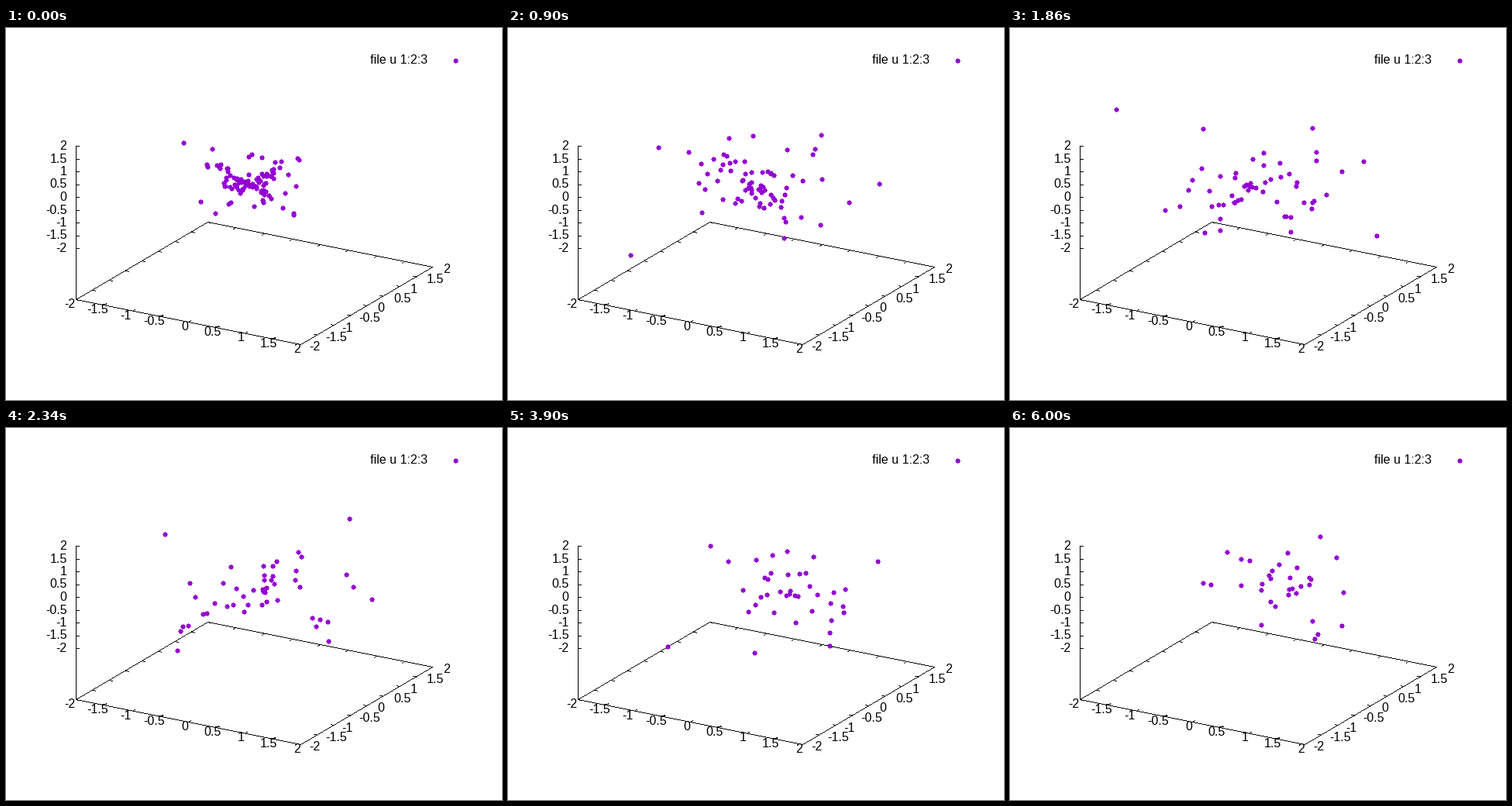
Animation, 640 px wide and 480 px high, one loop 6.06 s. Source, as a matplotlib script:

```python
import numpy as np
import matplotlib.pyplot as plt
from matplotlib.animation import FuncAnimation
from matplotlib.collections import PolyCollection

FRAMES, STEP = 101, 60
PURPLE = "#9400d3"
plt.rcParams["font.family"] = "Liberation Sans"
rng = np.random.default_rng(11)

fig = plt.figure(figsize=(8, 6), dpi=80, facecolor="white")
ax = fig.add_axes([0, 0, 1, 1])
ax.set(xlim=(0, 640), ylim=(480, 0))
ax.axis("off")


def stamp(pts, shape, color):
    """Put one hard-edged shape on the pixel under each point."""
    return ax.add_collection(PolyCollection(
        place(pts, shape), facecolors=color, edgecolors="none",
        antialiaseds=False))


def place(pts, shape):
    return np.floor(np.asarray(pts) + 0.5)[:, None, :] + 0.5 + shape


# Outlines over one quarter, turned four times; kept just inside the pixels.
TURN = np.array([(0, 1), (-1, 0)])


def quarters(*corner):
    return np.vstack([np.array(corner) @ np.linalg.matrix_power(TURN, k)
                      for k in range(4)])


PIXEL = quarters((-0.45, -0.45))
DOT = quarters((-2.45, -2.45), (-0.45, -2.45), (-0.45, -3.45),
               (0.45, -3.45), (0.45, -2.45))

# ---------------------------------------------------------------- axes
LEFT, FRONT, RIGHT, BACK = map(
    np.array, [(90.0, 350.0), (380.0, 408.0), (550.0, 308.0), (260.0, 250.0)])
TOP = np.array((90.0, 152.0))
TICK_X, TICK_Y, TICK_Z = map(np.array, [(4, 1), (3, -2), (4, 0)])


def line(a, b):
    n = int(np.abs(np.subtract(b, a)).max().round())
    stamp(np.linspace(a, b, n + 1), PIXEL, "black")


def label(x, y, text, ha):
    ax.text(x - 0.5, y + 5, text, fontsize=14.4, ha=ha, va="baseline")


for a, b in [(LEFT, FRONT), (FRONT, RIGHT), (RIGHT, BACK), (BACK, LEFT),
             (LEFT, TOP)]:
    line(a, b)
for k in range(9):
    f, text = k / 8, f"{k / 2 - 2:g}"
    pad = 0 if k < 4 else 3.5       # room kept for the minus sign
    front = LEFT + f * (FRONT - LEFT)
    back = BACK + f * (RIGHT - BACK)
    left = LEFT + f * (BACK - LEFT)
    right = FRONT + f * (RIGHT - FRONT)
    up = TOP + (0, 132 * (1 - f))
    for p, tick in [(front, TICK_Y), (back, -TICK_Y), (left, TICK_X),
                    (right, -TICK_X), (up, TICK_Z)]:
        line(p, p + tick)
    label(front[0] - 7.5 + pad, front[1] + 6, text, "center")
    label(right[0] + 11.5 + pad, right[1] + 3.5, text, "left")
    label(79, up[1], text, "right")
label(471, 41.5, "file u 1:2:3", "left")
stamp([(580, 42)], DOT, PURPLE)

# ---------------------------------------------------------------- motion
COUNT, CORE, DECAY = 100, 32, 30

# The number of bodies falls from COUNT towards CORE.
rank = np.arange(1, COUNT - CORE + 1) / (COUNT - CORE + 1)
life = np.concatenate([np.full(CORE, np.inf), -DECAY * np.log(rank)])

radius = np.clip(rng.gamma(2, 0.41, COUNT), 0.05, 2.2)
phase, tilt = rng.uniform(0, 2 * np.pi, (2, COUNT))
speed = 0.11 / (0.35 + radius) * rng.choice([-1, 1], COUNT)
kick = rng.exponential(0.7, COUNT)


def ease(s):
    s = np.clip(s, 0, 1)
    return s * s * (3 - 2 * s)


def bodies(t):
    """Bodies circling a drifting centre; some are flung out as they go."""
    center = np.array([315 + 43 * ease((t - 25) / 45), 203 + 0.08 * t])
    spread = np.array([28 + 36 * (1 - np.exp(-t / 10)) - 0.14 * t,
                       18 + 17 * (1 - np.exp(-t / 15))])
    angle = phase + speed * t
    orbit = np.stack([np.cos(angle), np.sin(angle + tilt)], axis=1)
    reach = radius * (1 + kick * np.minimum(t / life, 1) ** 4)
    pts = center + 1.4 * spread * reach[:, None] * orbit
    x, y = pts.T
    inside = (x > 124) & (x < 528) & (y > 100) & (y < 295)
    return pts[inside & (life >= t)]


cloud = stamp(bodies(0), DOT, PURPLE)


def draw(i):
    cloud.set_verts(place(bodies(i), DOT))
    return (cloud,)


anim = FuncAnimation(fig, draw, frames=FRAMES, interval=STEP,
                     repeat=True, repeat_delay=0, blit=False)
plt.show()
```
